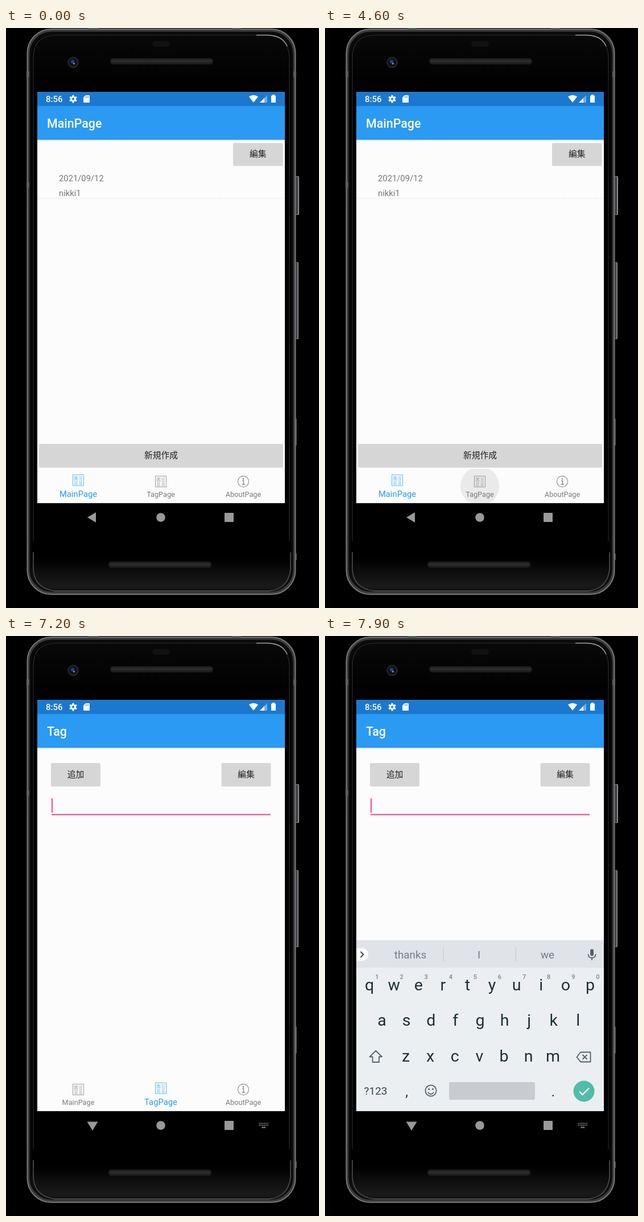
These frames come from a looping animation (550 by 1018 pixels, 8 s). An HTML page:

```html
<!DOCTYPE html>
<html lang="zh-Hans">
<head>
<meta charset="utf-8">
<title>Diary app</title>
<style>
html, body { margin: 0; width: 100%; height: 100%; overflow: hidden; background: #000; }
svg { display: block; width: 100vw; height: 100vh; }
text { font-family: Roboto, "Noto Sans CJK SC", "Noto Sans CJK JP", "Noto Sans CJK", sans-serif; }
.mid { text-anchor: middle; }
.line { fill: none; stroke: currentColor; }
</style>
</head>
<body>
<svg id="stage" viewBox="0 0 550 1018" preserveAspectRatio="none"></svg>
<script>
const LOOP = 8000, STEP = 100;
const BLUE = '#2a9af3', GREY = '#7c7c7c', PINK = '#ec4b90', PAGE = '#fcfcfc';
const stage = document.getElementById('stage');

const rect = (x, y, w, h, fill, rx = 0, more = '') =>
  `<rect x="${x}" y="${y}" width="${w}" height="${h}" rx="${rx}" fill="${fill}" ${more}/>`;
const circle = (x, y, r, fill, more = '') =>
  `<circle cx="${x}" cy="${y}" r="${r}" fill="${fill}" ${more}/>`;
const path = (d, fill, more = '') => `<path d="${d}" fill="${fill}" ${more}/>`;
const stroke = (d, color, width = 1, more = '') =>
  path(d, 'none', `stroke="${color}" stroke-width="${width}" ${more}`);
const text = (x, y, size, fill, s, more = '') =>
  `<text x="${x}" y="${y}" font-size="${size}" fill="${fill}" ${more}>${s}</text>`;
const mid = (x, y, size, fill, s, more = '') => text(x, y, size, fill, s, 'class="mid" ' + more);
const group = (id, body, more = '') => `<g id="${id}" ${more}>${body}</g>`;

const button = (x, y, w, h, label) =>
  rect(x - .5, y, w + 1, h + 1.2, '#c4c4c4', 2.5, 'opacity=".6"') +
  rect(x, y, w, h, '#d6d6d6', 2) +
  mid(x + w / 2, y + h / 2 + 4.7, 14.8, '#222', label);

function phone() {
  const outline = (x, y, r, color, width) =>
    rect(x, y, 546 - 2 * x, 996 - 2 * y, 'none', r, `stroke="${color}" stroke-width="${width}"`);
  const bump = (y, h, w, color) => rect(509, y, w, h, color, 1.5) + rect(509, y + 1, w - 2, h - 2, '#3c3c40');
  const slot = (x, y) => rect(x, y, 181, 11, '#1d1d1c', 5) + rect(x + 2, y + 2.5, 177, 5, '#2a2a29', 2.5);
  return `<defs>
    <linearGradient id="body" x2="0" y2="1">
      <stop offset="0" stop-color="#0a0a0b"/><stop offset=".1" stop-color="#000"/>
      <stop offset=".935" stop-color="#000"/><stop offset=".985" stop-color="#1a1a1b"/>
      <stop offset="1" stop-color="#111112"/>
    </linearGradient>
    <linearGradient id="shade" x2="0" y2="1">
      <stop offset="0" stop-color="#9aa2c0" stop-opacity=".6"/><stop offset="1" stop-color="#fff" stop-opacity="0"/>
    </linearGradient>
    <clipPath id="tabClip"><rect x="55" y="774" width="435" height="60"/></clipPath>
  </defs>` +
    rect(0, 0, 550, 1018, '#000') +
    bump(260, 68, 6, '#8a8a8e') + bump(411, 135, 5, '#828286') +
    bump(685, 48, 2, '#4a4a4c') + bump(922, 12, 2, '#4a4a4c') +
    rect(37, 2, 472, 992, 'url(#body)', 42) +
    outline(39.5, 4.5, 40, '#3c3c3e', 4) +
    outline(37.5, 2, 42, '#77777a', 2) +
    outline(43, 9, 38, '#0c0c0d', 3) +
    stroke('M48 900V52Q48 13 88 12.5H456Q497 13 498 52V900', '#2c2c2e', 1.2) +
    stroke('M440 12.5H460Q486 13 494 32', '#a0a0a4', 1.4) +
    stroke('M48 920V950Q50 984 86 988H462Q496 985 500 950V920', '#48484a', 1.8) +
    rect(36, 76, 5, 10, '#5c5c5f') + rect(36, 271, 5, 9, '#5c5c5f') + rect(505, 76, 5, 10, '#5c5c5f') +
    rect(145, 0, 16, 3, '#5c5c56') + rect(397, 0, 16, 3, '#5c5c56') +
    rect(257, 23, 31, 10, '#111115', 5) +
    slot(183, 53) + slot(180, 936.5) +
    circle(118, 60.5, 10, '#222224') + circle(118, 60.5, 7, '#0e0e18') +
    circle(117, 59, 3.2, '#303a7c') + circle(119.5, 62.5, 1.5, '#8494d8');
}

function statusBar() {
  let teeth = '';
  for (let a = 0; a < 360; a += 60)
    teeth += rect(116.4, 117.8, 3.2, 4, '#fff', .6, `transform="rotate(${a} 118 124.6)"`);
  return rect(55, 112, 435, 25, '#1c78cf') +
    text(70, 130, 15, '#fff', '8:56', 'font-weight="500"') +
    teeth + circle(118, 124.6, 3.5, 'none', 'stroke="#fff" stroke-width="2.8"') +
    path('M140 118H146Q147 118 147 119V130Q147 131 146 131H137Q136 131 136 130V122Z', '#fff') +
    stroke('M140.5 120V122.5M142.7 120V122.5M144.9 120V122.5', '#1c78cf', 1) +
    path('M427 120.6Q435 115 443 120.6L435 130.8Z', '#fff') +
    path('M459 118V131H446Z', '#fff', 'opacity=".4"') + path('M454 123V131H446Z', '#fff') +
    path('M468 118.5V117H472V118.5H473.2Q474 118.5 474 119.3V130.2Q474 131 473.2 131H466.8Q466 131 466 130.2V119.3Q466 118.5 466.8 118.5Z', '#fff');
}

const mainPage = () =>
  button(399.5, 202, 86.5, 39, '編集') +
  text(93, 269, 14.8, '#777', '2021/09/12') +
  text(93, 295, 14.8, '#777', 'nikki1') +
  stroke('M55 299H490', '#dcdce0', 1, 'stroke-dasharray="2 2"') +
  button(58.5, 730, 428, 40.5, '新規作成');

const tagPage = () =>
  button(79.5, 223, 86, 40, '追加') + button(379, 223, 86, 40, '編集') +
  rect(80, 312.8, 385, 1.2, '#858585', 0, 'id="idleLine"') +
  rect(80, 312.4, 385, 2.1, PINK, 0, 'id="focusLine"') +
  rect(80, 285, 2, 25, PINK, 0, 'id="cursor"');

const newsIcon = () => `<g class="line" stroke-width=".9" opacity=".8">
  <rect x="-9.5" y="-9.5" width="19" height="19"/>
  <rect x="-7" y="-6.5" width="6" height="6.5" stroke-width=".5"/>
  <circle cx="-4" cy="-4.5" r="1.3"/><path d="M-6.5-.5Q-4-4.5-1.5-.5M1.5-6H7M1.5-3.3H7M1.5-.6H7M-7 2.4H-1M1.5 2.4H7M-7 5H-1M1.5 5H7M-7 7.3H-1M1.5 7.3H7" stroke-width=".8"/></g>`;
const infoIcon = () => `<g opacity=".85"><g class="line" stroke-width="1.1"><circle r="9.6"/>
  <path d="M-2-1.5H.5V5M-2.5 5H3" stroke-width="1.4"/></g><circle cx="0" cy="-4.6" r="1.3" fill="currentColor"/></g>`;

const tab = (name, x, icon) => group('tab' + name,
  group('icon' + name, icon) + mid(x, 823, 12.7, 'currentColor', name + 'Page', `id="label${name}"`));

function navBar() {
  let dots = '';
  for (let r = 0; r < 3; r++)
    for (let c = r === 2 ? 2 : 0; c < (r === 2 ? 4 : 6); c++)
      dots += rect(444.5 + c * 2.9, 854.5 + r * 3.2, 1.9, 1.9, '#77777a');
  return path('M143 859L158 850V868Z', '#999', 'id="back"') +
    group('hide', path('M142.5 852.5H161.5L152 868Z', '#999') + dots + rect(449, 862, 7.5, 1.6, '#77777a')) +
    circle(272, 859, 7.8, '#999') + rect(384, 851, 16, 16, '#999', 1);
}

function keyboard() {
  const ink = '#1d2f38', soft = '#546169';
  let s = rect(55, 534, 435, 300, '#eceff1') + rect(55, 534, 435, 48, '#e0e3e7');
  s += path('M55 548H65A11 11 0 0 1 65 570H55Z', '#fff') + stroke('M62.5 554L67.5 559L62.5 564', '#37474f', 2);
  [['thanks', 150], ['I', 270.5], ['we', 391]].forEach(([w, x]) => s += mid(x, 566, 18.8, '#747e85', w));
  s += rect(207.5, 546, 1, 25, '#c2c7cb') + rect(334.5, 546, 1, 25, '#c2c7cb');
  s += rect(466, 549.5, 6, 12, soft, 3) + stroke('M462.5 558.5Q463 565 469 565Q475 565 475.5 558.5M469 565V569', soft, 1.8);
  [['qwertyuiop', 78, 622], ['asdfghjkl', 100, 684], ['zxcvbnm', 142, 747]].forEach(([keys, x, y]) =>
    [...keys].forEach((k, i) => s += mid(x + 43.1 * i, y, 28.5, ink, k)));
  for (let i = 0; i < 10; i++)
    s += mid(91.5 + 43.1 * i, 601.5, 11, '#7b868c', (i + 1) % 10, 'font-weight="500"');
  s += stroke('M89.3 728L100 738.5H95V748H83.6V738.5H78.6Z', soft, 1.8, 'stroke-linejoin="round"');
  s += stroke('M449 730.5H466.5V747.5H449L442.5 739Z', soft, 1.8, 'stroke-linejoin="round"') +
    stroke('M452.5 735L460.5 743M460.5 735L452.5 743', soft, 1.8);
  s += mid(89, 805, 19, '#37474f', '?123') + mid(143.5, 808, 24, ink, ',') + mid(401, 808, 24, ink, '.');
  s += circle(186, 798, 9.6, 'none', `stroke="${soft}" stroke-width="1.8"`) +
    circle(182.6, 795.3, 1.5, soft) + circle(189.4, 795.3, 1.5, soft) +
    stroke('M181 800.5Q182.5 804 186 804Q189.5 804 191 800.5', soft, 1.8);
  s += rect(218, 783, 151, 31, '#c8ccd0', 3) + circle(455, 799, 18.5, '#50bda8') +
    stroke('M447 799.5L452.5 805L464 793.5', '#fff', 2.4);
  return s;
}

stage.innerHTML = phone() +
  rect(55, 112, 435, 722, PAGE) + statusBar() +
  rect(55, 137, 435, 59, BLUE) + rect(55, 196, 435, 3.5, 'url(#shade)') +
  text(72, 175, 21.4, '#fff', '', 'id="title" font-weight="500"') +
  group('main', mainPage()) + group('tag', tagPage()) +
  group('tabs', circle(272, 804, 78, '#dadada', 'id="ripple"') +
    tab('Main', 127, newsIcon()) + tab('Tag', 272, newsIcon()) + tab('About', 417, infoIcon()),
    'clip-path="url(#tabClip)"') +
  navBar() + group('keys', keyboard());

const ui = {};
stage.querySelectorAll('[id]').forEach(el => ui[el.id] = el);

const clamp = v => Math.max(0, Math.min(1, v));
const span = (t, a, b) => clamp((t - a) / (b - a));
const easeOut = u => 1 - (1 - u) ** 2;
const show = (el, on) => el.setAttribute('display', on ? 'inline' : 'none');

function setTab(name, x, size, on) {
  ui['tab' + name].setAttribute('color', on ? BLUE : GREY);
  ui['icon' + name].setAttribute('transform', `translate(${x} ${796 - 2.3 * size})`);
  ui['label' + name].setAttribute('font-size', 12.7 + 2.1 * size);
}

function draw(t) {
  const onTag = t >= 4800, focused = t >= 7000, typing = t >= 7200;
  ui.title.textContent = onTag ? 'Tag' : 'MainPage';
  show(ui.main, !onTag);
  show(ui.tag, onTag);

  const shift = easeOut(span(t, 4900, 5200));
  setTab('Main', 127, 1 - shift, !onTag);
  setTab('Tag', 272, shift, onTag);
  setTab('About', 417, 0, false);

  show(ui.ripple, t >= 4600 && t < 5400);
  ui.ripple.setAttribute('r', 78 * easeOut(span(t, 4500, 4900)));
  ui.ripple.setAttribute('opacity', span(t, 4500, 4700) * (1 - span(t, 4900, 5400)));

  show(ui.idleLine, !focused);
  show(ui.focusLine, focused);
  show(ui.cursor, focused && !(t >= 7400 && t < 7900));
  show(ui.back, !typing);
  show(ui.hide, typing);

  show(ui.keys, t >= 7300);
  ui.keys.setAttribute('transform', `translate(0 ${16.5 * (1 - span(t, 7300, 7450)) ** 2})`);
  ui.keys.setAttribute('opacity', .8 + .2 * span(t, 7300, 7400));
}

const start = performance.now();
function tick() {
  const t = (performance.now() - start) % LOOP;
  draw(Math.floor(t / STEP) * STEP);
  requestAnimationFrame(tick);
}
tick();
</script>
</body>
</html>
```
